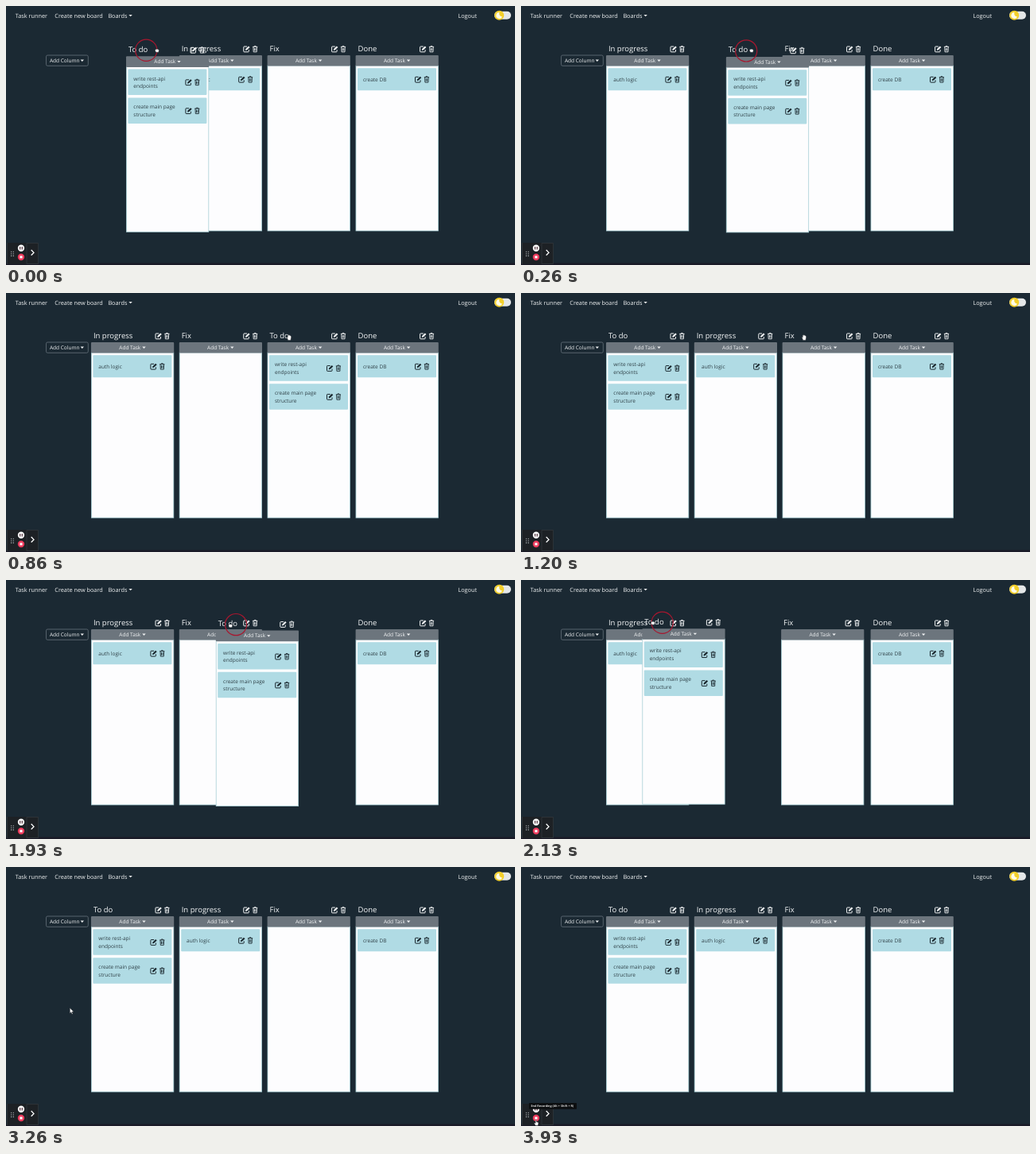
Write an HTML page that moves like this. It is 640x326 px and loops after 4000 ms.

```html
<!DOCTYPE html>
<html lang="en">
<head>
<meta charset="utf-8">
<title>Task board</title>
<style>
html, body { margin: 0; width: 100%; height: 100%; overflow: hidden; background: #1b2933; }
svg { display: block; width: 640px; height: 326px; }
text { font-family: "Open Sans", "Noto Sans", sans-serif; text-rendering: geometricPrecision; white-space: pre; }
.nav { font-size: 7.3px; fill: #f0f2f3; }
.title { font-size: 9.5px; font-weight: 500; fill: #f6f8f9; }
.small { font-size: 6.5px; fill: #f1f3f4; }
.task { font-size: 6.5px; fill: #2f4047; }
.tip { font-size: 3.8px; font-weight: 600; fill: #fff; }
.light { color: #f3f5f6; }
.dark { color: #17242b; }
</style>
</head>
<body>
<svg viewBox="0 0 640 326">
  <defs>
    <g id="edit">
      <path d="M4.8 1.2H1.3Q.6 1.2 .6 1.9V7.3Q.6 8 1.3 8H6.4Q7.1 8 7.1 7.3V5.2" fill="none" stroke="currentColor"/>
      <path d="M2.8 6 3.1 4.3 6.8.6 8.4 2.1 4.6 5.7Z" fill="currentColor"/>
    </g>
    <path id="bin" d="M.2 1.6H6.4M2 1.6 2.4.6H4.2L4.6 1.6M1 1.6 1.3 8H5.3L5.6 1.6M2.5 3.2V6.6M4.1 3.2V6.6"
      fill="none" stroke="currentColor" stroke-width=".85"/>
    <path id="caret" d="M0 0H4.4L2.2 2.3Z" fill="#f0f2f3"/>
  </defs>

  <rect width="640" height="326" fill="#1b2933"/>
  <rect y="323.5" width="640" height="2.5" fill="#1a1a27"/>

  <g class="nav">
    <text x="11.8" y="14.7">Task runner</text>
    <text x="61.3" y="14.7">Create new board</text>
    <text x="128.4" y="14.7">Boards</text>
    <text x="568.4" y="14.7">Logout</text>
  </g>
  <use href="#caret" x="154.4" y="11"/>
  <rect x="614" y="6.8" width="21" height="10" rx="5" fill="#e4e7e8"/>
  <circle cx="620.2" cy="11.8" r="6" fill="#f3cf2b"/>
  <path d="M620.5 8A4 4 0 1 0 624 13.4A3.8 3.8 0 0 1 620.5 8Z" fill="#fffbe6"/>

  <rect x="50.5" y="62" width="52.8" height="13.3" rx="1.8" fill="none" stroke="#66727b" stroke-width=".8"/>
  <text class="small" x="55" y="70.8">Add Column</text>
  <use href="#caret" x="93.6" y="67.6"/>

  <g id="board"></g>

  <g id="recorder">
    <rect x="1" y="298" width="40" height="27" fill="#1d2125"/>
    <path d="M1.5 298V325M26 298.5H40.5V324.5H26Z" fill="none" stroke="#343a40" stroke-width=".7"/>
    <g id="grip" fill="#b9bec2"></g>
    <circle cx="19" cy="304.7" r="4.2" fill="#fff"/>
    <path d="M17.7 303V306.4M20.3 303V306.4" stroke="#50343c" stroke-width="1.2"/>
    <circle cx="19" cy="316" r="4.2" fill="#ec3a5c"/>
    <rect x="17.4" y="314.4" width="3.2" height="3.2" rx=".4" fill="#fff"/>
    <path d="M31.7 307 35 310.4 31.7 313.8" fill="none" stroke="#fff" stroke-width="1.3"/>
  </g>
  <g id="tip">
    <rect x="10" y="297" width="60" height="7.8" rx=".8" fill="#0c0e10"/>
    <text class="tip" x="12.4" y="302.2">End Recording (Alt + Shift + R)</text>
  </g>

  <circle id="ring" r="13.6" fill="none" stroke="#a8172f" stroke-width="1.2"/>
  <g id="cursor" fill="#fff" stroke="#1a1f24" stroke-width=".5">
    <path id="fist" d="M-2.3-.8Q-1.8-2.2-.8-1.6Q.2-2.4 1-1.5Q2.4-1.6 2.4 0L1.8 2.3H-1.3L-2.5.6Z"/>
    <path id="hand" d="M-3-.6Q-2.4-1.2-1.7-.2L-1.9-2.8Q-1.2-3.6-.8-2.6Q-.2-4.2.4-2.8Q1.2-3.6 1.5-2.2Q2.7-2.4 2.7-.6L2 3.4H-1.4Z"/>
    <path id="arrow" d="M0 0V7L1.6 5.5 2.7 8 3.8 7.5 2.7 5.1H4.9Z"/>
    <path id="pointer" d="M-.8-2.2Q0-3.4.6-2.2V0Q2.9-.2 3 1.2L2.4 4.6H-.6L-2.6 1.6Q-1.8.6-.8 1.4Z"/>
  </g>
</svg>

<script>
const $ = id => document.getElementById(id);
const LOOP = 4000, STEP = LOOP / 60;
const slotX = n => 107 + 110.8 * n;

const icons = (x, y, tone) =>
  `<g class="${tone}"><use href="#edit" x="${x}" y="${y}"/><use href="#bin" x="${x + 11.7}" y="${y}"/></g>`;

function card(y, height, lines) {
  const mid = y + height / 2;
  const first = mid + 2.4 - (lines.length - 1) * 4.7;
  return `<rect x="2.4" y="${y}" width="99" height="${height}" rx="1" fill="#b0dbe4"/>` +
    lines.map((s, i) => `<text class="task" x="9.3" y="${first + i * 9.4}">${s}</text>`).join("") +
    icons(74.3, mid - 4.2, "dark");
}

function column(title, cards = "") {
  const g = document.createElementNS("http://www.w3.org/2000/svg", "g");
  g.innerHTML =
    `<text class="title" x="2.9" y="56.6">${title}</text>` + icons(80.4, 49.8, "light") +
    `<rect x=".4" y="75" width="103.4" height="208" fill="#fdfdfe" stroke="#a9d0d6" stroke-width=".8"/>
     <rect y="62" width="104.2" height="13.6" rx="1" fill="#6c757d"/>
     <text class="small" x="35.3" y="70.9">Add Task</text>
     <use href="#caret" x="64.3" y="67.6"/>` + cards;
  $("board").append(g);
  return g;
}

const progress = column("In progress", card(78.3, 28, ["auth logic"]));
const fix = column("Fix");
const done = column("Done", card(78.3, 28, ["create DB"]));
const todo = column("To do",
  card(78.3, 32.5, ["write rest-api", "endpoints"]) +
  card(114.2, 32.5, ["create main page", "structure"]));

for (let i = 0; i < 6; i++)
  $("grip").innerHTML += `<circle cx="${6.7 + i % 2 * 2.6}" cy="${309.3 + (i >> 1) * 2.6}" r=".65"/>`;

// cubic-bezier(.2, 0, 0, 1)
function ease(p) {
  if (p <= 0) return 0;
  if (p >= 1) return 1;
  let lo = 0, hi = 1, s;
  for (let i = 0; i < 20; i++) {
    s = (lo + hi) / 2;
    if (.6 * (1 - s) ** 2 * s + s ** 3 < p) lo = s; else hi = s;
  }
  return 3 * (1 - s) * s * s + s ** 3;
}

// rows: [time, ...values]; two rows at one time make a jump
function track(rows, t) {
  let i = rows.length - 1;
  while (i > 0 && rows[i][0] > t) i--;
  const a = rows[i], b = rows[i + 1] || a;
  const p = b === a ? 0 : (t - a[0]) / (b[0] - a[0]);
  return a.slice(1).map((v, k) => v + (b[k + 1] - v) * p);
}

// moves: [time, slot, duration]
const slide = (slot, moves, t) => moves.reduce((v, [at, to, dur]) =>
  t < at ? v : v + (to - v) * (dur ? ease((t - at) / dur) : 1), slot);

const REVERT = 1000, SAVED = 1400;
const home = slotX(0), third = slotX(2);
const todoPath = [
  [0, 151, 1.3], [133, 207, 1.6], [267, 258, 1.9], [467, 313, 2.1], [600, 328, 1.4], [740, third, 0],
  [REVERT, third, 0], [REVERT, home, 0], [SAVED, home, 0], [SAVED, third, 0],
  [1730, third, 0], [1800, 320, 1], [1933, 264, 1.6], [2133, 152.5, -.8], [2267, 109, -.6], [2400, home, 0]
];
const cursorPath = [
  [0, 190, 56], [133, 242, 56], [267, 290, 56], [467, 340.5, 56.5], [600, 355, 56], [740, 356, 56],
  [1730, 356, 56], [1800, 340, 56.5], [1933, 282.5, 57.5], [2133, 166, 54], [2267, 136, 52.5], [2400, 134, 52],
  [2870, 134, 52], [3200, 92, 150], [3530, 34, 285], [3730, 19, 321], [LOOP, 19, 321]
];
const progressMoves = [[45, 0, 200], [REVERT, 1, 0], [SAVED, 0, 0], [2135, 1, 200]];
const fixMoves = [[350, 1, 200], [REVERT, 2, 0], [SAVED, 1, 0], [1971, 2, 200]];

const place = (el, x, y = 0) => el.setAttribute("transform", `translate(${x.toFixed(2)} ${y.toFixed(2)})`);
const show = (el, on) => el.setAttribute("visibility", on ? "visible" : "hidden");

function draw(t) {
  const [x, y] = track(todoPath, t);
  place(todo, x, y);
  place(progress, slotX(slide(1, progressMoves, t)));
  place(fix, slotX(slide(2, fixMoves, t)));
  place(done, slotX(3) + .2);

  const [cx, cy] = track(cursorPath, t);
  place($("cursor"), cx, cy);
  place($("ring"), x + 25.3, y + 54.5);

  const pressed = t < 800 || (t > 1720 && t < 2600);
  const atButton = t > 3720;
  const travelling = t > 2920 && !atButton;
  show($("ring"), pressed);
  show($("fist"), pressed);
  show($("hand"), !pressed && !travelling && !atButton);
  show($("arrow"), travelling);
  show($("pointer"), atButton);
  show($("tip"), t > 3850);
}

const start = performance.now();
function tick() {
  const t = (performance.now() - start) % LOOP;
  draw(Math.floor((t + 7) / STEP) % 60 * STEP);
  requestAnimationFrame(tick);
}
tick();
</script>
</body>
</html>
```
